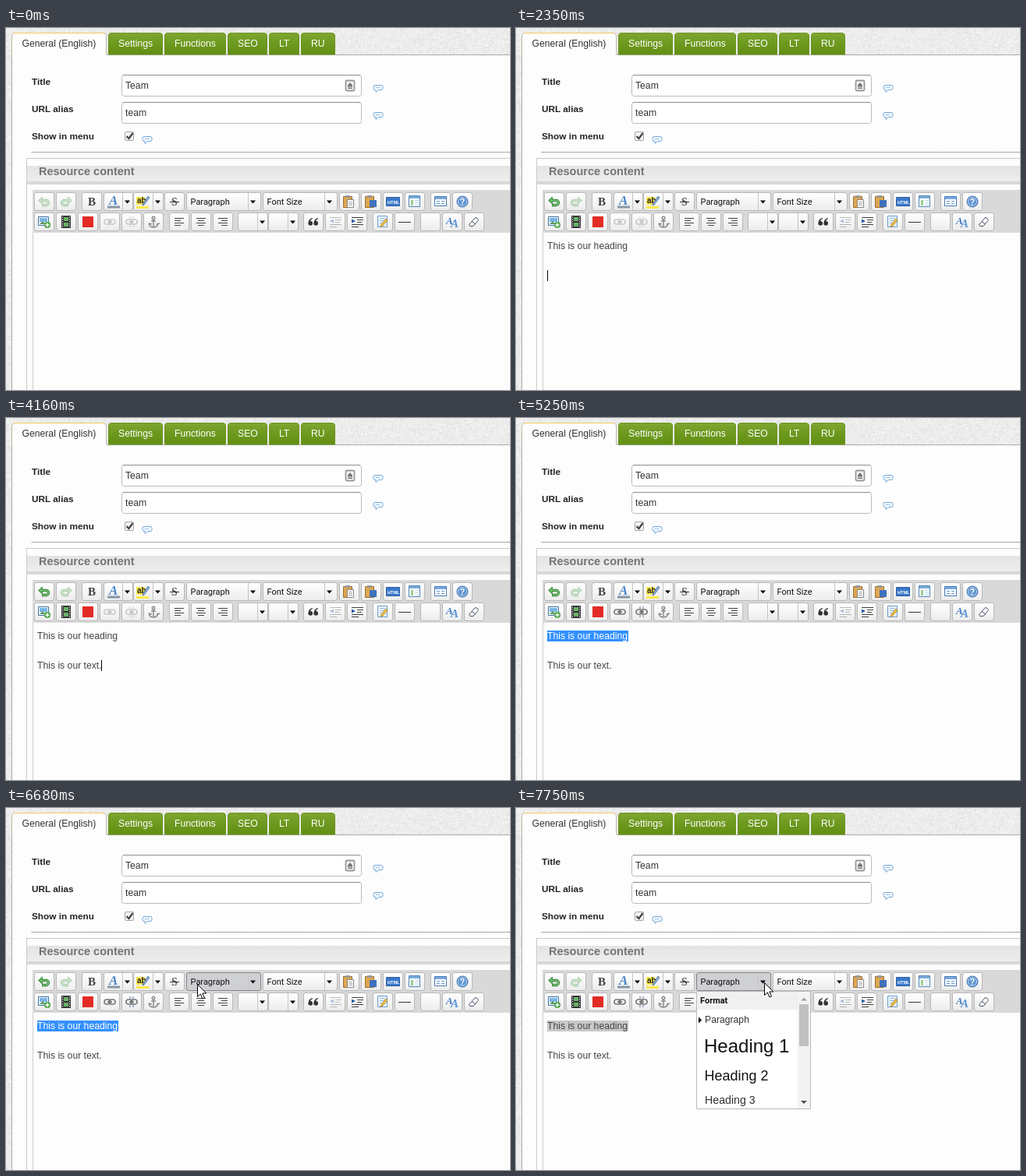
These frames come from a looping animation (646x465 px, 8 s). An HTML page with a canvas:

```html
<!DOCTYPE html>
<html lang="en">
<head>
<meta charset="utf-8">
<title>Resource editor</title>
<style>
html, body { margin: 0; width: 100%; height: 100%; overflow: hidden; background: #ebebeb; }
canvas, svg { position: absolute; left: 0; top: 0; display: block; }
text { font: 12.2px "Liberation Sans", Arial, sans-serif; fill: #333; white-space: pre; }
.label { font-size: 11.8px; font-weight: bold; fill: #222; }
.tab { fill: #fff; }
.ui { font: 11px Roboto, sans-serif; fill: #111; }
.serif { font-family: "Liberation Serif", serif; }
.line { fill: none; stroke: #444; }
.off { opacity: .35; }
</style>
</head>
<body>
<canvas id="weave" width="646" height="465"></canvas>
<svg width="646" height="465" viewBox="0 0 646 465">
  <defs>
    <linearGradient id="green" x2="0" y2="1"><stop stop-color="#7ea62f"/><stop offset=".5" stop-color="#6d991f"/><stop offset="1" stop-color="#628e12"/></linearGradient>
    <linearGradient id="button" x2="0" y2="1"><stop stop-color="#fff"/><stop offset="1" stop-color="#ececec"/></linearGradient>
    <linearGradient id="band" x2="0" y2="1"><stop stop-color="#e4e4e4"/><stop offset="1" stop-color="#ededed"/></linearGradient>

    <g id="bubble">
      <path d="M-4-4.5h8q2 0 2 2v2q0 2-2 2h-3.5l-3.5 3v-3h-1q-2 0-2-2v-2q0-2 2-2z" fill="#f1f8ff" stroke="#74a9d8"/>
      <path d="M-3-1.5h1m1 0h1m1 0h1" stroke="#5793cb"/>
    </g>
    <g id="undo">
      <path d="M-5-1.5H2.5a3 3 0 0 1 0 6H-3" fill="none" stroke="#2e7d32" stroke-width="3.4"/>
      <path d="M-7.500-1.5l5-4.500v9z" fill="#5fb55f" stroke="#2e7d32" stroke-width=".8"/>
      <path d="M-4-1.5H2.5a3 3 0 0 1 0 6H-2.500" fill="none" stroke="#7cc67c" stroke-width="1.6"/>
    </g>
    <g id="redo"><use href="#undo" transform="scale(-1 1)"/></g>
    <g id="bold"><text class="serif" x="-5" y="5" style="font-size:15px;font-weight:bold;fill:#444">B</text></g>
    <g id="color">
      <text class="serif" x="-6" y="4" style="font-size:17px;font-style:italic;font-weight:bold;fill:#4b87c9">A</text>
      <path d="M-8 5.500H8v3H-8z" fill="#8797a7"/>
    </g>
    <g id="marker">
      <path d="M-9-6H2V4H-9zM-9 6H7v3H-9z" fill="#ffe84a"/>
      <text x="-8" y="2" style="font-size:10px;font-weight:bold;fill:#222">ab</text>
      <path d="M8-5L1 4l-2 1 .5-2L6-7z" fill="#8fb2dc" stroke="#3c6599" stroke-width=".8"/>
    </g>
    <g id="strike">
      <text class="serif" x="-4" y="5" style="font-size:14px;font-weight:bold;fill:#555">S</text>
      <path d="M-6 .5H6" stroke="#333"/>
    </g>
    <g id="clipboard">
      <path d="M-7.500-6.500h11v14h-11z" fill="#dda650" stroke="#9b7133"/>
      <path d="M-5-8h6v3h-6z" fill="#999"/>
    </g>
    <g id="paste">
      <use href="#clipboard"/><path d="M-2.500-2.500h8v10h-8z" fill="#fff" stroke="#888"/>
      <path d="M-1 .5h5m-5 2h5m-5 2h5" stroke="#aaa"/>
    </g>
    <g id="pasteDoc"><use href="#clipboard"/><path d="M-2-2h9v9h-9z" fill="#3f72bd"/></g>
    <g id="html">
      <path d="M-8.500-5.500h17v11h-17z" fill="#3a79cb" stroke="#2d5da4"/>
      <text x="-7" y="2.500" style="font-size:5.6px;font-weight:bold;fill:#fff">HTML</text>
    </g>
    <g id="template">
      <path d="M-7.500-7.500h14v14h-14z" fill="#fff" stroke="#4f83b5"/><path d="M-7-7H6v3H-7z" fill="#79add8"/>
      <path d="M-5-2h3v7h-3z" fill="#9ad08f"/><path d="M0-1.500h5M0 1.500h5M0 4.500h5" stroke="#b8d9ed"/>
    </g>
    <g id="form">
      <path d="M-7.500-6.500h15v12h-15z" fill="#fff" stroke="#4679b7"/><path d="M-7-6H7v3H-7z" fill="#79a9df"/>
      <path d="M-5-.5h4m-4 3h4m2-3h4m-4 3h4" stroke="#6699cc"/>
    </g>
    <g id="help">
      <circle r="7" fill="#5f94d0" stroke="#4271ad"/><circle r="5.500" fill="none" stroke="#b7d4f2"/>
      <text x="-3.200" y="4" style="font-size:10.5px;font-weight:bold;fill:#fff">?</text>
    </g>
    <g id="image">
      <path d="M-7.500-6.500h13v11h-13z" fill="#fff" stroke="#396f9e"/><path d="M-6-5H4v5H-6z" fill="#78b5e5"/><path d="M-6 3l4-4 3 3 3-2v3z" fill="#5d9663"/>
      <circle cx="4" cy="4" r="4" fill="#4ca645"/><path d="M1.500 4h5M4 1.500v5" stroke="#fff" stroke-width="1.500"/>
    </g>
    <g id="film">
      <path d="M-6-8H6V8H-6z" fill="#333"/><path d="M-3-6h6v5h-6zM-3 1h6v5h-6z" fill="#69b166"/>
      <path d="M-4.500-7V8M4.500-7V8" stroke="#eee" stroke-dasharray="1.500"/>
    </g>
    <g id="video"><path d="M-7-7H7V7H-7z" fill="#e32b25"/></g>
    <g id="link" class="line" style="stroke:#777" stroke-width="1.700">
      <rect x="-7" y="-3" width="8" height="6" rx="2.500"/><rect x="-1" y="-3" width="8" height="6" rx="2.500"/><path d="M-3 0h6"/>
    </g>
    <g id="unlink"><use href="#link"/><path d="M-2-7v3m4-3v3m-4 8v3m4-3v3" stroke="#5d79a0"/></g>
    <g id="anchor" class="line" style="stroke:#8b8b8b" stroke-width="1.500">
      <circle cy="-5" r="1.800"/><path d="M0-3V7M-3-1h6M-6 2q1 5 6 5t6-5m-8 1l-4-1m10 1l4-1"/>
    </g>
    <path id="left" class="line" d="M-6-4.500H6M-6-1.500H2M-6 1.500H6M-6 4.500H2"/>
    <path id="center" class="line" d="M-6-4.500H6M-4-1.500H4M-6 1.500H6M-4 4.500H4"/>
    <path id="right" class="line" d="M-6-4.500H6M-2-1.500H6M-6 1.500H6M-2 4.500H6"/>
    <g id="quote" fill="#333">
      <path id="mark" d="M-1-5q-5 1-5.500 6a2.800 2.800 0 1 0 2.500-2q.5-2 3-3z"/><use href="#mark" x="7"/>
    </g>
    <g id="indent">
      <path class="line" d="M-7-5.500H8M0-2.500h8M0 .5h6M-7 3.500H8M-7 6.500h9"/><path d="M-7-3.500l5 2.500-5 2.500z" fill="#2857a4"/>
    </g>
    <g id="outdent">
      <path class="line" d="M-7-5.500H8M0-2.500h8M0 .5h6M-7 3.500H8M-7 6.500h9"/><path d="M-2-3.500l-5 2.500 5 2.500z" fill="#2857a4"/>
    </g>
    <g id="edit">
      <path d="M-6.500-7.500h12v14h-12z" fill="#e9f3fc" stroke="#6e9ccb"/><path d="M-4-4.500h7m-7 3h7m-7 3h4" stroke="#9bbbd8"/>
      <path d="M6-2L0 5l-3 1.500 1-3L4-4z" fill="#f5c344" stroke="#a77c25" stroke-width=".8"/>
    </g>
    <path id="rule" d="M-8 .5H8" stroke="#333"/>
    <g id="styles">
      <text class="serif" x="-8" y="3" style="font-size:13px;font-style:italic;font-weight:bold;fill:#3f78bd">A</text>
      <text class="serif" x="-2" y="7" style="font-size:15px;font-style:italic;font-weight:bold;fill:#5d97d7">A</text>
    </g>
    <path id="eraser" d="M-6 3L1-5q1-1 2 0l2 1.500q1 1 0 2L-1 5.500h-4q-2-1-1-2.500zM-3-.5L2 3" fill="#fff" stroke="#454e64"/>
  </defs>

  <rect x="7.500" y="34.500" width="650" height="440" fill="#fdfdfd" stroke="#aaa"/>
  <g id="tabs"></g>
  <path d="M8 36V11q0-4 4-4H125q4 0 4 4V36z" fill="#fdfdfd"/>
  <path d="M7.500 36V11q0-4.500 4.500-4.500H124q4.500 0 4.500 4.500V34" fill="none" stroke="#c2bba3"/>
  <path d="M10 6.500H126" stroke="#f5cc62"/>
  <text x="20.500" y="24">General (English)</text>

  <text class="label" x="33" y="73">Title</text>
  <text class="label" x="33" y="108">URL alias</text>
  <text class="label" x="33" y="143">Show in menu</text>
  <g fill="#fff" stroke="#bbb">
    <rect x="148.500" y="60.500" width="307" height="27" rx="3"/>
    <rect x="148.500" y="95.500" width="307" height="27" rx="3"/>
    <path d="M150 60.500H454M150 95.500H454" stroke="#8e8e8e"/>
  </g>
  <text x="153" y="78">Team</text>
  <text x="153" y="113">team</text>
  <rect x="435.500" y="67.500" width="11" height="13" rx="1.500" fill="#f5f5f5" stroke="#999" stroke-width="1.800"/>
  <path d="M438 76.500h6v1.500h-6zM441 70l3 3.500v2h-6v-2z" fill="#777"/>
  <use href="#bubble" x="477" y="78"/><use href="#bubble" x="477" y="113"/><use href="#bubble" x="181" y="144"/>
  <rect x="152.500" y="133.500" width="11" height="11" rx="1.500" fill="#f3f3f3" stroke="#a5a5a5"/>
  <path d="M154.500 139l3 3 5-7" fill="none" stroke="#444" stroke-width="2.200"/>
  <path d="M33 159.500H646" stroke="#555" stroke-dasharray="1 1" shape-rendering="crispEdges"/>

  <rect x="26.500" y="167.500" width="630" height="310" fill="#fdfdfd" stroke="#c9c9c9"/>
  <path d="M27 177H646V197H27z" fill="url(#band)"/>
  <path d="M27 197H646V201H27z" fill="#d8d8d8"/>
  <text x="42" y="189" style="font-size:14.5px;font-weight:bold;fill:#747474">Resource content</text>
  <rect x="34.500" y="208.500" width="620" height="270" fill="#fdfdfd" stroke="#ccc"/>
  <path d="M34 208H646V263H34z" fill="#d9d9d9"/>
  <g id="toolbar"></g>

  <rect id="selection" x="40" y="273" width="104" height="14"/>
  <text id="heading" x="40" y="284"></text>
  <text id="body" x="40" y="322"></text>
  <rect id="caret" width="1" height="14" fill="#000"/>

  <g id="menu">
    <path d="M231.500 235.500h146v151h-146z" fill="#fff" stroke="#bbb"/>
    <path d="M232 236h129v23h-129z" fill="#f0f0f0"/>
    <path d="M361 236h16v150h-16z" fill="#f3f3f3"/>
    <path d="M363 252h12v54h-12z" fill="#c1c1c1"/>
    <path d="M365 247.500l4-4 4 4z" fill="#a3a3a3"/><path d="M365 376l4 4 4-4z" fill="#505050"/>
    <path d="M234 268.500l4 4-4 4z" fill="#000"/>
    <text class="ui" x="236" y="251" style="font-weight:bold">Format</text>
    <text x="242" y="276">Paragraph</text>
    <text x="241" y="314" style="font-size:24px;fill:#111">Heading 1</text>
    <text x="241.500" y="350" style="font-size:18px;fill:#111">Heading 2</text>
    <text x="242" y="380" style="font-size:14.2px">Heading 3</text>
  </g>
  <path id="cursor" d="M.5.5V16.500l3.800-3.500 2.700 6 2.500-1.100-2.700-5.900h5z" fill="#fff" stroke="#000"/>
</svg>

<script>
const $ = id => document.getElementById(id);
const show = (el, on) => { el.style.display = on ? '' : 'none'; };

// Woven backdrop, visible above and to the left of the panel.
function paintWeave() {
  const ctx = $('weave').getContext('2d');
  let seed = 7;
  const rand = n => (seed = seed * 16807 % 2147483647) % n;
  ctx.fillStyle = '#ebebeb';
  ctx.fillRect(0, 0, 646, 465);
  for (let i = 0; i < 12000; i++) {
    ctx.fillStyle = ['#f3f3f3', '#e4e4e4', '#efefef'][i % 3];
    const length = 1 + rand(4), across = rand(2);
    const [x, y] = i % 5 ? [rand(646), rand(36)] : [rand(8), rand(465)];
    ctx.fillRect(x, y, across ? length : 1, across ? 1 : length);
  }
}

function buildTabs() {
  const tabs = [['Settings', 131, 70], ['Functions', 203, 79], ['SEO', 284, 51], ['LT', 337, 39], ['RU', 378, 44]];
  $('tabs').innerHTML = tabs.map(([name, x, w]) => `
    <path d="M${x + .5} 34V10q0-3.500 3.500-3.500H${x + w - 4}q3.500 0 3.500 3.500V34z" fill="url(#green)" stroke="#6b951f"/>
    <text class="tab" x="${x + 13}" y="24">${name}</text>`).join('');
}

const frame = (x, y, w, id = '') =>
  `<rect ${id && `id="${id}"`} x="${x + .5}" y="${y + .5}" width="${w - 1}" height="23" rx="2.500" fill="url(#button)" stroke="#b9b9b9"/>`;
const icon = (name, x, y) =>
  `<use id="${name}Icon" href="#${name}" x="${x + 13}" y="${y + 12}"/>`;
const button = (name, x, y) => frame(x, y, 26, name && name + 'Box') + (name && icon(name, x, y));
const dropArrow = (x, y) =>
  `<path d="M${x + .5} ${y + 1}v22" stroke="#c4c4c4"/><path d="M${x + 3} ${y + 10.5}h7l-3.500 4z" fill="#000"/>`;
const split = (name, x, y, w = 38) =>
  frame(x, y, w) + (name && icon(name, x, y)) + dropArrow(x + w - 14, y);
const select = (label, x, id) =>
  frame(x, 211, 96, id) + dropArrow(x + 79, 211) + `<text class="ui" x="${x + 5.5}" y="227">${label}</text>`;

function buildToolbar() {
  const row = (y, items) => items.map(([name, x]) => button(name, x, y)).join('');
  $('toolbar').innerHTML =
    row(211, [['undo', 36], ['redo', 64], ['bold', 97], ['strike', 203], ['paste', 427], ['pasteDoc', 455],
      ['html', 483], ['template', 511], ['form', 544], ['help', 572]]) +
    split('color', 125, 211) + split('marker', 163, 211, 39) +
    select('Paragraph', 231, 'format') + select('Font Size', 329, 'size') +
    row(237, [['image', 36], ['film', 64], ['video', 92], ['link', 120], ['unlink', 148], ['anchor', 176],
      ['left', 209], ['center', 237], ['right', 265], ['quote', 381], ['outdent', 409], ['indent', 437],
      ['edit', 470], ['rule', 498], ['', 531], ['styles', 559], ['eraser', 587]]) +
    split('', 297, 237, 39) + split('', 336, 237, 39);
  for (const name of ['redo', 'outdent']) $(name + 'Icon').classList.add('off');
}

// Spreads state changes evenly from start to end.
const spread = (start, end, changes) => changes.map((set, i) =>
  ({ at: Math.round((start + (end - start) * i / (changes.length - 1)) / 10) * 10, set }));
const at = (time, set) => ({ at: time, set });
const type = (start, end, line, prefix, parts) =>
  spread(start, end, parts.map(part => ({ [line]: prefix + part, caret: line, at: null })));
const move = (start, end, points) => spread(start, end, points.map(point => ({ mouse: point })));

const initial = { heading: '', body: '', caret: '', at: null, selected: '', mouse: null, hover: '', menu: false };
const events = [
  ...type(500, 1220, 'heading', '', ['T', 'Th', 'This', 'This ', 'This is', 'This is o', 'This is ou']),
  ...type(1350, 1700, 'heading', 'This is our', ['', ' h', ' he', ' hea']),
  ...type(1920, 2130, 'heading', 'This is our head', ['', 'in', 'ing']),
  at(2350, { caret: 'body' }),
  ...type(2710, 3200, 'body', '', ['T', 'Th', 'This', 'This is', 'This is ']),
  ...type(3450, 3800, 'body', 'This is ', ['o', 'our', 'our t', 'our te']),
  ...type(4040, 4160, 'body', 'This is our tex', ['', 't.']),
  at(4760, { caret: 'heading', at: 15 }),
  at(5010, { at: 0 }),
  at(5250, { caret: '', selected: '#3390ff' }),
  ...move(5870, 6570, [[78, 446], [40, 372], [27, 328], [78, 330], [132, 325], [190, 280], [222, 231]]),
  at(6570, { hover: 'strikeBox' }),
  ...move(6680, 7370, [[245, 226], [257, 230], [271, 233], [285, 234], [297, 232], [307, 228], [314, 225]]),
  at(6680, { hover: 'format' }),
  at(7500, { mouse: [318, 224] }),
  at(7750, { menu: true, selected: '#c8c8c8' })
];

const ruler = document.createElement('canvas').getContext('2d');
ruler.font = '12.2px "Liberation Sans", Arial, sans-serif';

function render(time) {
  const s = Object.assign({}, initial, ...events.filter(e => e.at <= time).map(e => e.set));
  $('heading').textContent = s.heading;
  $('body').textContent = s.body;
  $('heading').style.fill = s.selected && !s.menu ? '#fff' : '#444';
  $('body').style.fill = '#444';

  show($('caret'), s.caret);
  if (s.caret) {
    const before = s[s.caret].slice(0, s.at ?? undefined);
    $('caret').setAttribute('x', 40 + Math.floor(ruler.measureText(before).width));
    $('caret').setAttribute('y', s.caret === 'heading' ? 273 : 311);
  }
  show($('selection'), s.selected);
  $('selection').style.fill = s.selected || 'none';

  $('undoIcon').classList.toggle('off', !s.heading);
  for (const name of ['link', 'unlink']) $(name + 'Icon').classList.toggle('off', !s.selected);
  for (const id of ['strikeBox', 'format']) {
    $(id).style.fill = s.hover === id ? '#cfd0d3' : '';
    $(id).style.stroke = s.hover === id ? '#858585' : '';
  }
  show($('menu'), s.menu);
  show($('cursor'), s.mouse);
  if (s.mouse) $('cursor').setAttribute('transform', `translate(${s.mouse})`);
}

function tick() {
  render(performance.now() % 8000);
  requestAnimationFrame(tick);
}

paintWeave();
buildTabs();
buildToolbar();
tick();
</script>
</body>
</html>
```
